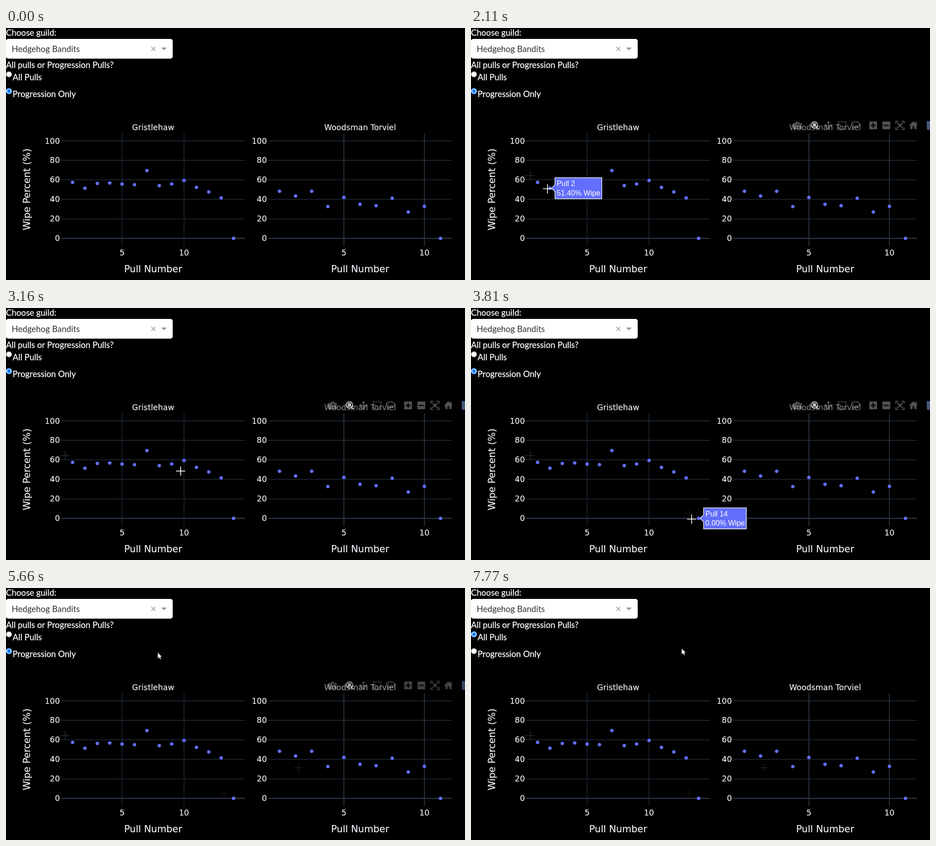
Animation, 1009 px wide and 555 px high, one loop 8 s. Source, as an HTML page:

```html
<!DOCTYPE html>
<html lang="en">
<head>
<meta charset="utf-8">
<title>Wipe percent by pull</title>
<style>
html, body { margin: 0; width: 100%; height: 100%; overflow: hidden; background: #000; }
svg { display: block; width: 100vw; height: 100vh; }
.ui { font: 18.6px Lato, sans-serif; fill: #fff; stroke: #fff; stroke-width: .25px; }
.dark { fill: #333; stroke: none; }
.plot { font: 17.4px "DejaVu Sans", Verdana, sans-serif; fill: #f2f5fa; stroke: #f2f5fa; stroke-width: .15px; }
.axis { font-size: 20.9px; }
.tip { font: 16.1px "Liberation Sans", Arial, sans-serif; fill: #fff; }
.mid { text-anchor: middle; }
.end { text-anchor: end; }
</style>
</head>
<body>
<svg id="stage" viewBox="0 0 1009 555"></svg>
<script>
const LOOP = 8000, TICK = 65.83;
const FADE_IN = 6, FADE_OUT = 85, FADE = 5, CLICK = 111;
const WIDTH = 403, TOP = 232, BOTTOM = 480;
const stage = document.getElementById('stage');
const $ = id => document.getElementById(id);
const clamp = v => Math.max(0, Math.min(1, v));

const charts = [
  { name: 'Gristlehaw', left: 122, first: 146.3, gap: 27.23, grid: 1.2,
    wipes: [57.4, 51.4, 56.3, 56.81, 55.7, 55.1, 69.5, 54.1, 55.8, 59.4, 52.3, 47.6, 41.4, 0] },
  { name: 'Woodsman Torviel', left: 577, first: 601.2, gap: 35.4, grid: 2,
    wipes: [48.34, 43.4, 48.34, 32.6, 41.9, 34.9, 33.5, 41.1, 27, 32.8, 0] }
];
const yOf = pct => 463.3 - pct * 2.148;
const xOf = (c, pull) => c.first + c.gap * (pull - 1);
const points = charts.flatMap(c =>
  c.wipes.map((w, i) => ({ pull: i + 1, w, x: xOf(c, i + 1), y: yOf(w) })));

// Pointer stops: arrival tick, x, y, ticks of rest afterwards
const stops = [
  [6, 492, 548], [11, 204, 514], [18, 105, 307], [22, 130, 325], [25, 137, 338, 3],
  [33, 176, 358, 3], [40, 239, 353], [49, 402, 360], [55, 462, 385], [58, 485, 465, 4],
  [72, 664, 378, 3], [76, 672, 371], [78, 700, 380], [84, 612, 172], [88, 55, 112],
  [96, 340, 54, 4], [106, 55, 111, 8], [118, 463, 133]
];
// Faint crosses left behind: tick, x, y, brightness
const trails = [[23, 130, 325, 0.17], [58, 479, 453, 0.07], [71, 643, 396, 0.13]];

const text = (x, y, s, cls, extra = '') => `<text x="${x}" y="${y}" class="${cls}" ${extra}>${s}</text>`;
const line = (x1, y1, x2, y2, w) =>
  `<path d="M${x1} ${y1}L${x2} ${y2}" stroke="#283442" stroke-width="${w}"/>`;
const cross = 'M-10 0H10M0-10V10';

function chart(c) {
  const mid = c.left + WIDTH / 2;
  let s = '';
  for (let v = 0; v <= 100; v += 20) {
    const y = yOf(v);
    s += line(c.left, y, c.left + WIDTH, y, v ? 1.4 : 2.4);
    s += text(c.left - 3.5, y + 6, v, 'plot end');
  }
  for (const v of [5, 10]) {
    const x = xOf(c, v);
    s += line(x, TOP, x, BOTTOM, c.grid) + text(x, 500.5, v, 'plot mid');
  }
  return s + text(mid, 225, c.name, 'plot mid') + text(mid, 537.5, 'Pull Number', 'plot axis mid');
}

function radio(id, y, label) {
  return `<g transform="translate(6.5 ${y})">
    <circle id="${id}Ring" r="6.2" fill="#fff" stroke-width="1.2"/>
    <circle id="${id}Dot" r="3.9" fill="#0075ff"/></g>` + text(14.5, y + 12.8, label, 'ui');
}

function modebar() {
  const icon = (x, body) => `<g transform="translate(${x} 214.5)">${body}</g>`;
  const stroke = (d, w = 2) => `<path d="${d}" fill="none" stroke="#fff" stroke-width="${w}"/>`;
  const fill = d => `<path d="${d}" fill="#fff" fill-rule="evenodd"/>`;
  const box = 'M-8.5-8.5H8.5V8.5H-8.5Z';
  return `<g id="modebar"><rect x="698" y="205" width="311" height="20" opacity=".5"/>
    <g opacity=".32">
    ${icon(717.5, fill('M-9.5-5H-5L-3-8H3L5-5H9.5V8H-9.5ZM-4.5 1A4.5 4.5 0 1 0 4.5 1A4.5 4.5 0 1 0-4.5 1Z') + '<circle cy="1" r="2.6" fill="#fff"/>')}
    ${icon(786, stroke('M-7 0H7M0-7V7') + fill('M-10 0L-5-4V4ZM10 0L5-4V4ZM0-10L4-5H-4ZM0 10L4 5H-4Z'))}
    ${icon(816, '<rect x="-8.5" y="-8" width="17" height="16" fill="none" stroke="#fff" stroke-width="2.5" stroke-dasharray="2.5 2.2"/>')}
    ${icon(845, '<ellipse cy="-2" rx="9" ry="6" fill="none" stroke="#fff" stroke-width="2"/>' + stroke('M-5 3Q-8 7-3 9'))}
    ${icon(884, fill(box + 'M-1.3-5.5H1.3V-1.3H5.5V1.3H1.3V5.5H-1.3V1.3H-5.5V-1.3H-1.3Z'))}
    ${icon(913, fill(box + 'M-5.5-1.3H5.5V1.3H-5.5Z'))}
    ${icon(943, stroke('M-9-4V-9H-4M4-9H9V-4M9 4V9H4M-4 9H-9V4M-6-6L6 6M6-6L-6 6') + '<circle r="3" fill="#fff"/>')}
    ${icon(972.5, fill('M-10 0L0-9L4-5.5V-8H7V-3L10 0H7V8H2V2H-2V8H-7V0Z'))}
    </g>
    <g opacity=".75">${icon(755, '<circle cy="-1" r="7" fill="none" stroke="#fff" stroke-width="2"/>' +
      '<rect x="-3.5" y="-5" width="7" height="8" fill="#fff"/>' + stroke('M4.5 4L9 8.5', 2.6))}</g>
    <rect x="1002" y="205" width="19" height="19" fill="#43587f"/></g>`;
}

stage.innerHTML = `
  <rect width="1009" height="555"/>
  ${text(0, 16.7, 'Choose guild:', 'ui')}
  <rect y="24" width="366.5" height="43.5" rx="5" fill="#fff"/>
  ${text(12.5, 52.7, 'Hedgehog Bandits', 'ui dark')}
  <path d="M319.5 41.5L328.5 50.5M328.5 41.5L319.5 50.5" stroke="#999" stroke-width="1.5"/>
  <path id="caret" d="M341 43H353.5L347.2 49.3Z"/>
  ${text(0, 88, 'All pulls or Progression Pulls?', 'ui')}
  ${radio('all', 102, 'All Pulls')}
  ${radio('prog', 139, 'Progression Only')}
  ${charts.map(chart).join('')}
  ${text(0, 0, 'Wipe Percent (%)', 'plot axis mid', 'transform="translate(52.5 355.5) rotate(-90)"')}
  ${points.map(p => `<circle cx="${p.x}" cy="${p.y}" r="3.8" fill="#636efa"/>`).join('')}
  ${modebar()}
  ${trails.map(([, x, y, o], i) => `<path id="trail${i}" d="${cross}" transform="translate(${x} ${y})" stroke="#fff" stroke-width="1.5" opacity="${o}"/>`).join('')}
  <g id="pointer">
    <path id="cross" d="${cross}" stroke="#fff" stroke-width="1.7"/>
    <path id="resize" d="M0-11L4.5-6H1V6H4.5L0 11L-4.5 6H-1V-6H-4.5Z" fill="#fff"/>
    <path id="arrow" d="M0 0V13.5L3.2 10.7L5.3 15.2L7.5 14.2L5.5 9.8H9.5Z" fill="#fff" stroke="#222" stroke-width=".7"/>
    <path id="hand" d="M-1.6 1Q0-1 1.6 1V6Q3 5 4.2 6.5Q5.6 5.6 6.6 7.2Q8.8 6.7 8.8 9V12Q8.8 14.5 7.2 17H-.2Q-1.2 14-4 10.8Q-4.6 8.6-1.6 10Z" fill="#fff" stroke="#111" stroke-width="1.1"/>
  </g>
  <g id="tip">
    <path id="tipBox" fill="#636efa" stroke="#fff" stroke-width="1.3"/>
    <text id="tipPull" x="15" y="-4.5" class="tip"></text>
    <text id="tipWipe" x="15" y="16" class="tip"></text>
  </g>`;

const show = (id, on) => $(id).setAttribute('visibility', on ? 'visible' : 'hidden');
const set = (id, name, value) => $(id).setAttribute(name, value);

function pointerAt(k) {
  const i = Math.max(1, stops.findIndex(s => s[0] >= k));
  const [from, ax, ay, rest = 0] = stops[i - 1], [to, bx, by] = stops[i];
  const u = clamp((k - from - rest) / (to - from - rest));
  return [ax + (bx - ax) * u, ay + (by - ay) * u];
}

function pointerKind(x, y) {
  if (y > 24 && y < 67 && x < 366) return 'hand';
  if (y > TOP && y < BOTTOM) {
    if (charts.some(c => x >= c.left && x <= c.left + WIDTH)) return 'cross';
    if (charts.some(c => x > c.left - 55 && x < c.left)) return 'resize';
  }
  return 'arrow';
}

function setRadio(id, on) {
  set(id + 'Ring', 'stroke', on ? '#0075ff' : '#767676');
  show(id + 'Dot', on);
}

function showTip(x, y, active) {
  let best = null, reach = 20;
  if (active) for (const p of points) {
    const d = Math.hypot(p.x - x, p.y - y);
    if (d < reach) { reach = d; best = p; }
  }
  show('tip', best);
  if (!best) return;
  const right = best.w < 10 ? 105 : 114;
  set('tip', 'transform', `translate(${best.x} ${best.y})`);
  set('tipBox', 'd', `M3.5 0L11-7.5V-23.2H${right}V23.2H11V7.5Z`);
  $('tipPull').textContent = 'Pull ' + best.pull;
  $('tipWipe').textContent = best.w.toFixed(2) + '% Wipe';
}

function render(t) {
  // The picture advances in steps of one tick
  const k = Math.min(118, Math.floor((t + 12) / TICK));
  const [x, y] = pointerAt(k);
  const kind = pointerKind(x, y), visible = k >= stops[0][0];
  set('pointer', 'transform', `translate(${x} ${y})`);
  for (const id of ['cross', 'resize', 'arrow', 'hand']) show(id, visible && id === kind);
  showTip(x, y, visible && kind === 'cross');
  set('modebar', 'opacity', clamp((k - FADE_IN + 1) / FADE) * clamp((FADE_OUT + FADE - k) / FADE));
  set('caret', 'fill', kind === 'hand' ? '#666' : '#999');
  setRadio('all', k >= CLICK);
  setRadio('prog', k < CLICK);
  trails.forEach(([from], i) => show('trail' + i, k >= from));
}

const start = performance.now();
function loop() {
  render((performance.now() - start) % LOOP);
  requestAnimationFrame(loop);
}
loop();
</script>
</body>
</html>
```
